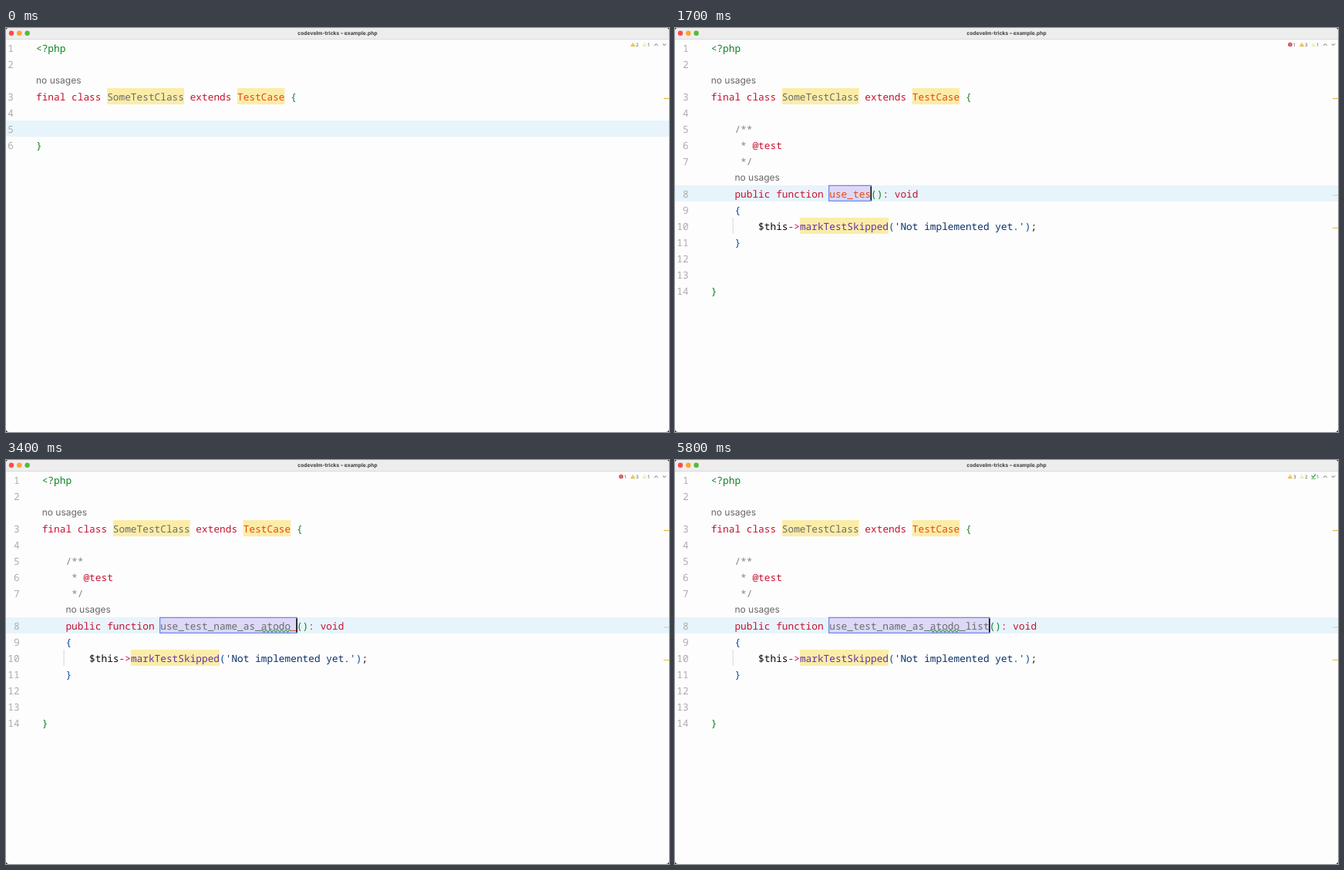
An HTML page that plays this animation: 860x524 px, repeating every 5900 ms.

```html
<!DOCTYPE html>
<html lang="en">
<head>
<meta charset="utf-8">
<title>Editor live template</title>
<style>
html, body { margin: 0; width: 100%; height: 100%; overflow: hidden; background: #222; }
svg { display: block; width: 860px; height: 524px; }
text { white-space: pre; text-rendering: geometricPrecision; }
.code { font: 500 12.8px "Noto Sans Mono", "DejaVu Sans Mono", monospace; }
.hint { font: 12px Inter, "Open Sans", sans-serif; fill: #696969; }
.title { font: 700 6.75px Inter, "Open Sans", sans-serif; fill: #3d3d3d; text-anchor: middle; }
.count { font: 6px Inter, "Open Sans", sans-serif; fill: #5c5c5c; }
</style>
</head>
<body>
<svg id="stage" viewBox="0 0 860 524"></svg>
<script>
const LOOP = 5900, CHAR = 7.68, ROW = 21;
const NAME = 'use_test_name_as_atodo_list';
const RED = '#c9102f', GREEN = '#108020', ORANGE = '#e8470f', GRAY = '#6b6b6b',
  NAVY = '#0a3069', BLUE = '#0b4a9e', PURPLE = '#6232ad', MARK = '#fbeda8',
  COMMENT = '#858585', WARN = '#f0bd3a', PALE = '#f4ebb8', BLACK = '#080808';

const stage = document.getElementById('stage');
let left = 39;

const px = col => left + col * CHAR;
const mid = row => 26 + row * ROW;
const rect = (x, y, w, h, fill, extra = '') =>
  `<rect x="${x}" y="${y}" width="${w}" height="${h}" fill="${fill}" ${extra}/>`;
const escapeText = s => String(s).replace(/&/g, '&amp;').replace(/</g, '&lt;').replace(/>/g, '&gt;');
const label = (cls, x, y, s, extra = '') =>
  `<text class="${cls}" x="${x}" y="${y}" ${extra}>${escapeText(s)}</text>`;
const code = (col, row, s, fill) =>
  label('code', px(col), mid(row) + 4.5, s, `fill="${fill}"`);
const hint = (col, row) => label('hint', px(col), mid(row) + 4.3, 'no usages');
const marked = (col, row, s, fill) =>
  rect(px(col), mid(row) - 11, s.length * CHAR, ROW, MARK) + code(col, row, s, fill);
const line = (d, color, width) =>
  `<path d="${d}" fill="none" stroke="${color}" stroke-width="${width}" stroke-linecap="round" stroke-linejoin="round"/>`;
const stripe = (y, color) => rect(853, y - 0.6, 7, 1.2, color);

function wave(col, row, chars, color) {
  const n = Math.round(chars * 3), step = chars * CHAR / n;
  let d = `M${px(col)} ${mid(row) + 6.8}`;
  for (let i = 0; i < n; i++) d += `q${step / 2} ${i % 2 ? 2.6 : -2.6} ${step} 0`;
  return line(d, color, 1.1);
}

function chrome() {
  const dots = ['#ff4b45', '#f8a52c', '#55b83c'];
  return rect(0, 0, 860, 524, '#fdfdfd', 'rx="4"') +
    `<path d="M0 14V4Q0 0 4 0H856Q860 0 860 4V14Z" fill="#ededed"/>` +
    rect(0, 14, 860, 0.8, '#d4d4d4') +
    dots.map((c, i) => `<circle cx="${7 + i * 10.3}" cy="6.8" r="3.2" fill="${c}"/>`).join('') +
    label('title', 430, 8.9, 'codevelm-tricks – example.php');
}

function icon(kind, x) {
  if (kind === 'error')
    return `<circle cx="${x}" cy="21.4" r="2.7" fill="#d63b48"/>` + rect(x - 0.4, 19.8, 0.8, 2, '#fff') +
      rect(x - 0.4, 22.4, 0.8, 0.8, '#fff');
  if (kind === 'typo')
    return line(`M${x - 2.4} 20.6l1.8 2 3-3.8`, '#2d9a3f', 1.2) +
      line(`M${x - 2.6} 24.2h4.8`, '#2d9a3f', 0.8);
  return `<path d="M${x} 18.6l3.2 5.5h-6.4z" fill="${kind === 'warn' ? WARN : PALE}"/>` +
    rect(x - 0.35, 20.4, 0.7, 1.9, '#fff');
}

function status(items) {
  const start = 828.3 - (items.length - 1) * 15.2;
  return items.map(([kind, n], i) => {
    const x = start + i * 15.2;
    return icon(kind, x) + label('count', x + 4, 23.6, n);
  }).join('') +
    line('M841.4 22.5l1.9-1.9 1.9 1.9', '#555', 0.9) +
    line('M852.1 20.7l1.9 1.9 1.9-1.9', '#555', 0.9);
}

function gutter(count, rowOf) {
  let out = '';
  for (let n = 1; n <= count; n++) {
    const s = String(n), x = left - 29 - s.length * CHAR;
    out += label('code', x, mid(rowOf(n)) + 4.5, s, 'fill="#adadad" style="font-weight:400"');
  }
  return out;
}

const header = () =>
  code(0, 0, '<?php', GREEN) + hint(0, 2) +
  code(0, 3, 'final class', RED) + marked(12, 3, 'SomeTestClass', GRAY) +
  code(26, 3, 'extends', RED) + marked(34, 3, 'TestCase', ORANGE) + code(43, 3, '{', GREEN);

function before(s) {
  left = 39;
  return rect(0, 120, 860, 21, '#e8f4fb') +
    gutter(6, n => n < 3 ? n - 1 : n) + header() +
    (s.abbr ? code(4, 5, '@', RED) + code(5, 5, 'ts'.slice(0, s.abbr - 1), ORANGE) : '') +
    code(0, 6, '}', GREEN) +
    (s.broken ? wave(44, 3, 1, '#e0182d') : '') +
    stripe(91.5, s.broken ? '#d8424c' : '#e9b93f') +
    status([['warn', 2], ['weak', 1]]);
}

function after(s) {
  left = 39 + CHAR;
  const end = 20 + s.typed, x = px(20);
  return rect(0, 204, 860, 21, '#e8f4fb') +
    gutter(14, n => n < 3 ? n - 1 : n < 8 ? n : n + 1) + header() +
    code(4, 5, '/**', COMMENT) + code(5, 6, '*', COMMENT) + code(7, 6, '@test', RED) +
    code(5, 7, '*/', COMMENT) + hint(4, 8) +
    rect(x - 0.6, 204.3, s.typed * CHAR + 1, 20, '#dcd8f6', 'stroke="#4c73e6" stroke-width="1"') +
    code(4, 9, 'public function', RED) +
    code(20, 9, NAME.slice(0, s.known), GRAY) +
    code(20 + s.known, 9, NAME.slice(s.known, s.typed), ORANGE) +
    code(end, 9, '()', GREEN) + code(end + 2, 9, ':', RED) + code(end + 4, 9, 'void', RED) +
    (s.typed ? '' : wave(19, 9, 1, '#e0182d')) +
    (s.known >= 22 ? wave(37, 9, 5, '#2f9440') : '') +
    (s.caret ? rect(px(end) - 0.5, 205.5, 1.5, 18, '#000') : '') +
    code(4, 10, '{', BLUE) + rect(74.6, 246, 1, 21, '#d6d6d6') +
    code(8, 11, '$this', BLACK) + code(13, 11, '->', RED) +
    marked(15, 11, 'markTestSkipped', PURPLE) + code(30, 11, '(', BLUE) +
    code(31, 11, "'Not implemented yet.'", NAVY) + code(53, 11, ')', BLUE) + code(54, 11, ';', BLACK) +
    code(4, 12, '}', BLUE) + code(0, 15, '}', GREEN) +
    stripe(91.5, '#e9b93f') + stripe(217, s.typed ? '#c9d6de' : '#5d86bd') + stripe(259.5, '#e9c93f') +
    status(s.known === NAME.length
      ? [['warn', 3], ['weak', 2], ['typo', 1]]
      : [['error', 1], ['warn', 3], ['weak', 1]]);
}

const clamp = (v, max) => Math.max(0, Math.min(max, Math.floor(v)));

// Typing comes in bursts; colouring catches up after each pause.
function typedAt(t) {
  return clamp((t - 1200) / 70, 17) + clamp((t - 2400) / 100, 5) +
    (t >= 3300 ? 1 : 0) + clamp((t - 3400) / 100, 4);
}
const knownAt = t => t < 1800 ? 0 : t < 2700 ? 8 : t < 3200 ? 17 : t < 4300 ? 22 : 27;

function stateAt(t) {
  if (t < 800) return { abbr: clamp(t / 200, 3), broken: t >= 500 };
  const typed = typedAt(t);
  return {
    typed,
    known: Math.min(typed, knownAt(t)),
    caret: t < 4300 || Math.floor((t - 3800) / 500) % 2 === 0
  };
}

let shown = '';
function frame() {
  const t = performance.now() % LOOP;
  const s = stateAt(t), key = JSON.stringify(s);
  if (key !== shown) {
    shown = key;
    stage.innerHTML = chrome() + (t < 800 ? before(s) : after(s));
  }
  requestAnimationFrame(frame);
}
frame();
</script>
</body>
</html>
```
